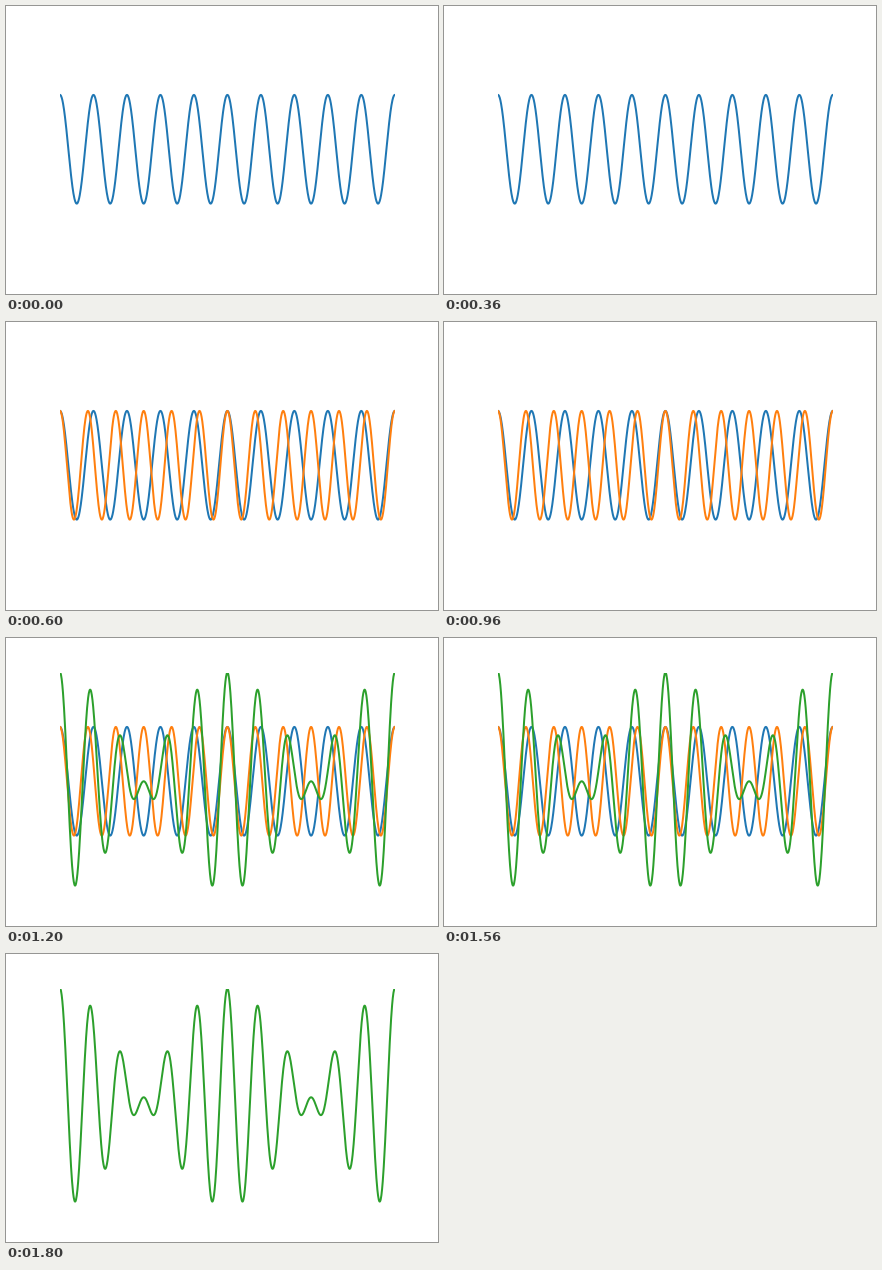
These frames come from a looping animation (432x288 px, 2400 ms). A matplotlib script:

```python
import numpy as np
import matplotlib.pyplot as plt
from matplotlib.animation import FuncAnimation

# Which waves are visible at each step: first, second, sum
STEPS = [(1, 0, 0), (1, 1, 0), (1, 1, 1), (0, 0, 1)]

fig = plt.figure(figsize=(6, 4), dpi=72, facecolor="white")
ax = fig.add_axes([0.125, 0.11, 0.775, 0.77])
ax.set_xlim(0, 1)
ax.set_ylim(-2.08, 2)
ax.axis("off")

t = np.linspace(0, 1, 1001)
slow = np.cos(2 * np.pi * 10 * t)
fast = np.cos(2 * np.pi * 12 * t)
waves = [
    ax.plot(t, y, color=color, lw=2)[0]
    for y, color in zip((slow, fast, slow + fast), ("C0", "C1", "C2"))
]


def update(i):
    for wave, shown in zip(waves, STEPS[i % len(STEPS)]):
        wave.set_visible(bool(shown))
    return waves


anim = FuncAnimation(fig, update, frames=len(STEPS), interval=600,
                     repeat=True, repeat_delay=0)
plt.show()
```
